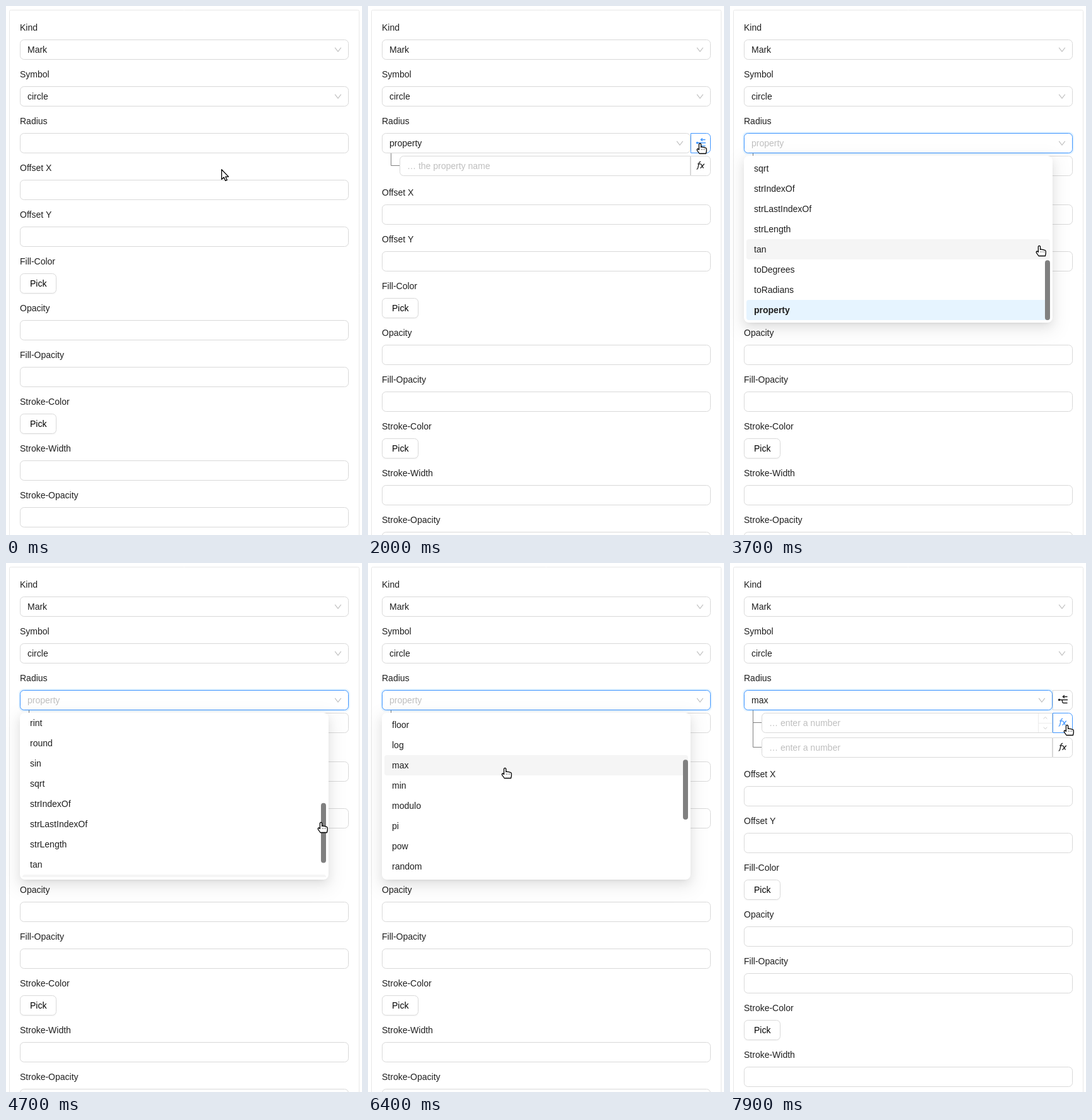
An HTML page with a canvas that plays this animation: 564x837 px, repeating every 8000 ms.

```html
<!DOCTYPE html>
<html lang="en">
<head>
<meta charset="utf-8">
<title>Symbol form</title>
<style>
html, body { margin: 0; width: 100%; height: 100%; overflow: hidden; background: #fff; }
canvas { display: block; width: 564px; height: 837px; }
</style>
</head>
<body>
<canvas id="stage" width="564" height="837"></canvas>
<script>
const ctx = document.getElementById('stage').getContext('2d');
const LOOP = 8000, TICK = 100;
const INK = '#1f1f1f', LINE = '#d9d9d9', FAINT = '#bfbfbf', BLUE = '#4096ff';
const FONT = '14px "Liberation Sans", Arial, sans-serif';

const fields = ['Kind', 'Symbol', 'Radius', 'Offset X', 'Offset Y', 'Fill-Color', 'Opacity',
  'Fill-Opacity', 'Stroke-Color', 'Stroke-Width', 'Stroke-Opacity'];
const options = ('abs acos asin atan atan2 ceil cos exp floor log max min modulo pi pow random rint ' +
  'round sin sqrt strIndexOf strLastIndexOf strLength tan toDegrees toRadians property').split(' ');

// time, x, y, smooth arrival
const path = [
  [100, 341, 258], [900, 462, 218, 1], [1000, 462, 218], [1100, 467, 216], [1700, 526, 213, 1],
  [1800, 526, 213], [2400, 527, 228, 1], [2500, 527, 228], [2900, 491, 218, 1], [3100, 491, 218],
  [4000, 489, 436, 1], [4100, 492, 426], [4200, 500, 424], [4300, 505, 435], [4400, 505, 435],
  [4700, 499, 410], [5500, 495, 374], [6000, 492, 345], [6100, 492, 345], [6600, 67, 313, 1],
  [6800, 67, 313], [7000, 158, 301], [7600, 490, 258], [7700, 515, 257], [7900, 534, 256]
];
const scrolls = [[4400, 608], [4700, 516], [5500, 365], [6000, 257]];

const clamp = v => Math.max(0, Math.min(1, v));
const within = (t, a, b) => t >= a && t < b;

// 0..1 level of a hover that starts at a and ends at b
const level = (t, a, b, delay = 0) =>
  clamp((t - a - delay) / 200) * (1 - clamp((t - b - delay) / 200));

function track(keys, t) {
  if (t <= keys[0][0]) return keys[0].slice(1);
  const i = keys.findIndex(k => k[0] >= t);
  if (i < 0) return keys[keys.length - 1].slice(1);
  const a = keys[i - 1], b = keys[i];
  let p = (t - a[0]) / (b[0] - a[0]);
  if (b[3]) p = p * p * (3 - 2 * p);
  return [1, 2].map(n => a[n] + (b[n] - a[n]) * p);
}

function mix(from, to, p) {
  return `rgb(${from.map((v, i) => Math.round(v + (to[i] - v) * p))})`;
}
const edge = p => mix([217, 217, 217], [64, 150, 255], p);
const glyph = p => mix([31, 31, 31], [64, 150, 255], p);

function text(s, x, mid, color = INK, weight = '') {
  ctx.font = weight + ' ' + FONT;
  ctx.fillStyle = color;
  ctx.fillText(s, x, mid + 5);
}

function shape(x, y, w, h, r, fill) {
  ctx.beginPath();
  ctx.roundRect(x, y, w, h, r);
  ctx.fillStyle = fill;
  ctx.fill();
}

function box(x, y, w, h = 32, color = LINE, r = 6) {
  ctx.beginPath();
  ctx.roundRect(x + .5, y + .5, w - 1, h - 1, r);
  ctx.fillStyle = '#fff';
  ctx.fill();
  ctx.strokeStyle = color;
  ctx.lineWidth = 1;
  ctx.stroke();
}

function lines(d, color, width = 1, x = 0, y = 0) {
  ctx.save();
  ctx.translate(x, y);
  ctx.strokeStyle = color;
  ctx.lineWidth = width;
  ctx.stroke(new Path2D(d));
  ctx.restore();
}

function chevron(x, y) {
  lines('M-4.8 -3.2L0 3L4.8 -3.2', FAINT, 1.1, x, y);
}

function select(x, y, w, value, color, border) {
  box(x, y, w, 32, border);
  text(value, x + 12, y + 16, color);
  chevron(x + w - 17, y + 16);
}

function addon(y, icon, hover) {
  box(511, y, 32, 32, edge(hover), [0, 6, 6, 0]);
  icon(511, y, glyph(hover));
}

function fx(x, y, color) {
  lines('M9.6 21.3q1.6 0 2.1-2.2l1.7-7.6q.5-2.4 2.8-2M11.2 12.8h5' +
    'M16.4 12.8l4 6.9M21.8 12.8l-6.2 6.9', color, 1.3, x, y);
}

function tree(x, y, color) {
  lines('M10.5 15.5H24M14 15.5q1.5 0 1.5 2.5t2 2.5H23.5M16.5 10.5H23.5M18.8 8.2L16.3 10.5L18.8 12.8',
    color, 1.3, x, y);
  shape(x + 8.8, y + 13.7, 3.6, 3.6, 1.8, color);
}

function spinner(y, alpha) {
  if (!alpha) return;
  ctx.save();
  ctx.globalAlpha = alpha;
  lines('M488.5 1V31M489 16.5H510', LINE, 1, 0, y);
  lines('M496.6 9.6L499.5 6.8L502.4 9.6M496.6 22.8L499.5 25.6L502.4 22.8', '#8c8c8c', .9, 0, y);
  ctx.restore();
}

function numberInput(x, y, tools, hover, spin) {
  box(x, y, (tools ? 511 : 543) - x, 32, edge(hover), tools ? [6, 0, 0, 6] : 6);
  if (tools) spinner(y, spin);
}

function subInput(t, y, hint, tools, from, to, fxHover) {
  if (tools) addon(y, fx, fxHover);
  numberInput(50, y, tools, level(t, from, to), level(t, from, to, 100));
  text('… ' + hint, 62, y + 16, FAINT);
}

function radius(t) {
  const tools = within(t, 600, 3400) || t >= 6900;
  if (t < 1900) {
    if (tools) addon(201, fx, level(t, 1400, LOOP));
    numberInput(22, 201, tools, level(t, 500, 1400), level(t, 500, 1400, 100));
    return;
  }
  const open = within(t, 3200, 6800), picked = t >= 6800;
  const hint = picked ? 'enter a number' : 'the property name';
  lines('M36.5 233V' + (picked ? '291.5H50M36.5 252.5H50' : '252.5H50'), '#808080');
  subInput(t, 237, hint, tools, picked ? 7300 : LOOP, 7700, level(t, 7700, LOOP));
  if (picked) subInput(t, 276, hint, tools, 7000, 7300, 0);

  const w = tools ? 489 : 521;
  if (t >= 3200) shape(20, 199, w + 4, 36, 8, 'rgba(5,145,255,.1)');
  if (tools) addon(201, tree, 1 - clamp((t - 2600) / 200));
  select(22, 201, w, picked ? 'max' : 'property', open ? FAINT : INK,
    t >= 3200 ? BLUE : edge(level(t, 2600, LOOP)));
}

function shadow(dy, blur, spread, alpha) {
  ctx.save();
  ctx.shadowColor = `rgba(0,0,0,${alpha})`;
  ctx.shadowBlur = blur;
  ctx.shadowOffsetX = 2000;
  ctx.shadowOffsetY = dy;
  shape(22 - spread - 2000, 237 - spread, 489 + 2 * spread, 264 + 2 * spread, 8, '#000');
  ctx.restore();
}

function activeRow(t, y, scroll) {
  if (t >= 6200) return 10;
  if (t >= 4100) return 24;
  return y < 241 ? 26 : Math.floor((y - 241 + scroll) / 32);
}

function dropdown(t, y) {
  if (!within(t, 3200, 7000)) return;
  const u = clamp((t - 3150) / 200);
  const show = t < 6800 ? 1 - (1 - u) ** 3 : 1 - (t - 6750) / 200;
  const scroll = track(scrolls, t)[0];
  ctx.save();
  ctx.globalAlpha = show;
  ctx.translate(0, 237);
  ctx.scale(1, .8 + .2 * show);
  ctx.translate(0, -237);
  shadow(6, 16, 0, .08);
  shadow(3, 6, -4, .12);
  shadow(9, 28, 8, .05);
  shape(22, 237, 489, 264, 8, '#fff');
  ctx.beginPath();
  ctx.rect(22, 241, 489, 256);
  ctx.clip();
  const active = activeRow(t, y, scroll), chosen = t < 6800 ? 26 : 10;
  options.forEach((name, i) => {
    const top = 241 + i * 32 - scroll;
    if (top < 205 || top > 500) return;
    if (i === chosen) shape(26, top, 481, 32, 4, '#e6f4ff');
    else if (i === active) shape(26, top, 481, 32, 4, '#f5f5f5');
    text(name, 38, top + 16, INK, i === chosen ? 'bold' : '');
  });
  const size = 2560 / options.length;
  const top = Math.min(256 - size, 2 + scroll / 608 * (256 - size));
  shape(499, 241 + top, 8, size, 4, '#808080');
  ctx.restore();
}

function outlined(d) {
  const p = new Path2D(d);
  ctx.lineJoin = 'round';
  ctx.fillStyle = '#fff';
  ctx.fill(p);
  ctx.strokeStyle = '#000';
  ctx.lineWidth = 1.3;
  ctx.stroke(p);
}

const cursors = {
  arrow() {
    outlined('M.6 .8V16.3L4.2 13L6.7 18.4L9.2 17.3L6.8 12.1H11.6Z');
  },
  beam() {
    const d = 'M-2.6 -6H-1Q0 -6 0 -5V5Q0 6 -1 6H-2.6M2.6 -6H1Q0 -6 0 -5M0 5Q0 6 1 6H2.6';
    ctx.lineCap = 'square';
    lines(d, '#000', 3);
    lines(d, '#fff', 1);
  },
  hand() {
    outlined('M-1.6 1.6Q0 -.8 1.6 1.6V6.4Q3.2 5.4 4.4 6.6Q6 5.8 7.2 7.2Q10.3 7 10.3 9.5V12.5' +
      'L9.4 16.5H-1L-4.6 11.4Q-5.2 9 -3.2 9L-1.6 10.4Z');
    ctx.fillStyle = '#000';
    for (const x of [2, 4.5, 7]) ctx.fillRect(x, 9.5, 1, 1);
  }
};

function cursorKind(t) {
  if (t < 600) return 'arrow';
  if (t < 1400) return 'beam';
  if (t < 5400) return 'hand';
  if (t < 6200) return 'arrow';
  if (t < 6900) return 'hand';
  return t < 7700 ? 'beam' : 'hand';
}

function draw(t) {
  ctx.clearRect(0, 0, 564, 837);
  ctx.fillStyle = '#fff';
  ctx.fillRect(0, 0, 564, 837);
  box(5, 6, 555, 860, '#e8e8e8', 2);

  const push = t < 1900 ? 0 : t < 6800 ? 39 : 78;
  fields.forEach((name, i) => {
    const y = 53 + i * 74 + (i > 2 ? push : 0);
    text(name, 22, y - 19);
    if (i < 2) {
      select(22, y, 521, i ? 'circle' : 'Mark', INK, LINE);
    } else if (name.endsWith('Color')) {
      shape(22, y + 2, 58, 32, 6, 'rgba(0,0,0,.02)');
      box(22, y, 58);
      text('Pick', 38, y + 16, '#000');
    } else if (i > 2) {
      box(22, y, 521);
    }
  });
  radius(t);

  const [x, y] = track(path, t);
  dropdown(t, y);
  ctx.save();
  ctx.translate(Math.round(x), Math.round(y));
  cursors[cursorKind(t)]();
  ctx.restore();
}

const start = performance.now();
function frame() {
  const t = (performance.now() - start) % LOOP;
  draw(Math.floor(t / TICK) * TICK);
  requestAnimationFrame(frame);
}
frame();
</script>
</body>
</html>
```
